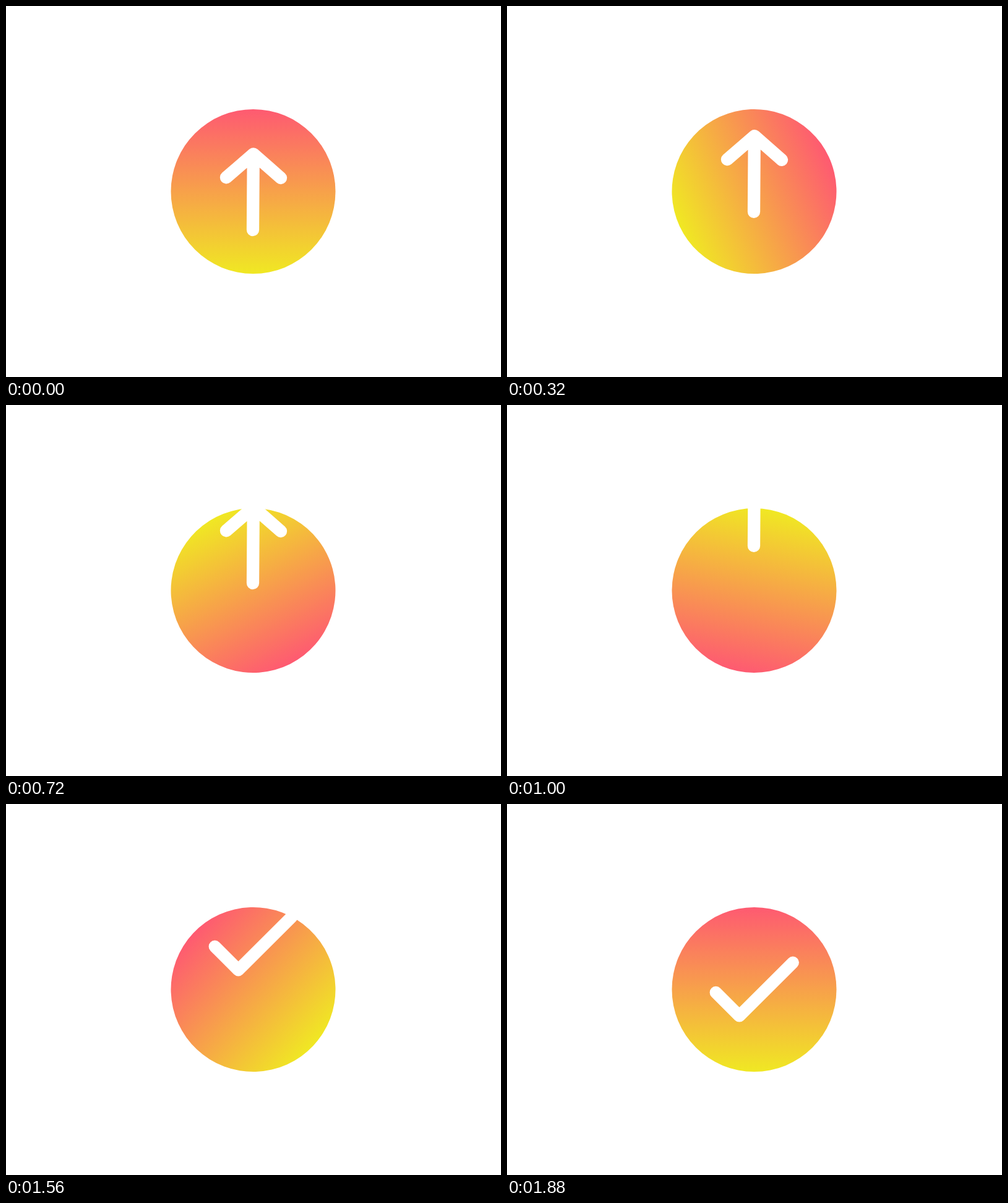
These frames come from a looping animation (800x600 px, 2200 ms). An HTML page:

```html
<!DOCTYPE html>
<html lang="en">
<head>
<meta charset="utf-8">
<title>Upload button</title>
<style>
  html, body { margin: 0; width: 100%; height: 100%; overflow: hidden; background: #fff; }
  svg { display: block; width: 100vw; height: 100vh; }
  .mark { fill: none; stroke: #fff; stroke-width: 20.3; stroke-linecap: round; stroke-linejoin: round; }
  #check { stroke-width: 19.8; }
</style>
</head>
<body>
<svg viewBox="0 0 800 600">
  <defs>
    <linearGradient id="glow" gradientUnits="userSpaceOnUse" x1="399.5" y1="167" x2="399.5" y2="433">
      <stop offset="0" stop-color="#fe5a71"/>
      <stop offset="1" stop-color="#f0e823"/>
    </linearGradient>
  </defs>
  <circle id="disc" cx="399.5" cy="300" r="133" fill="url(#glow)"/>
  <path id="arrow" class="mark" d="M356 277.3 L400 239.3 L444 278 M399.8 240 L399 362"/>
  <path id="check" class="mark" d="M337.5 304.7 L375.5 342.7 L462 256.5"/>
</svg>
<script>
const LOOP = 2200, STEP = 40;
const TURN_END = 1880, HALF_TURN = TURN_END / 2;
const LIFT_MID = 720, LIFT_END = 1440, DROP_START = 1360;

const progress = (t, from, to) => Math.min(1, Math.max(0, (t - from) / (to - from)));

// Bends a straight ramp: positive starts fast, negative starts slow.
const bend = (u, amount) => u + amount * u * (1 - u);

// Each half turn gathers speed, then brakes.
const halfTurn = u => 180 * (u + 0.82 * u ** 3 * (1 - u));

const angle = t =>
  halfTurn(progress(t, 0, HALF_TURN)) + halfTurn(progress(t, HALF_TURN, TURN_END));

const arrowY = t =>
  -74 * bend(progress(t, 0, LIFT_MID), -0.2)
  - 132 * bend(progress(t, LIFT_MID, LIFT_END), 0.28);

const checkY = t => -196 * (1 - progress(t, DROP_START, TURN_END)) ** 2;

const find = id => document.getElementById(id);
const disc = find("disc"), arrow = find("arrow"), check = find("check");

function draw(t) {
  disc.setAttribute("transform", `rotate(${angle(t)} 399.5 300)`);
  arrow.setAttribute("transform", `translate(0 ${arrowY(t)})`);
  check.setAttribute("transform", `translate(0 ${checkY(t)})`);
}

const start = performance.now();
function tick() {
  const t = (performance.now() - start) % LOOP;
  draw(Math.floor(t / STEP) * STEP);
  requestAnimationFrame(tick);
}
tick();
</script>
</body>
</html>
```
